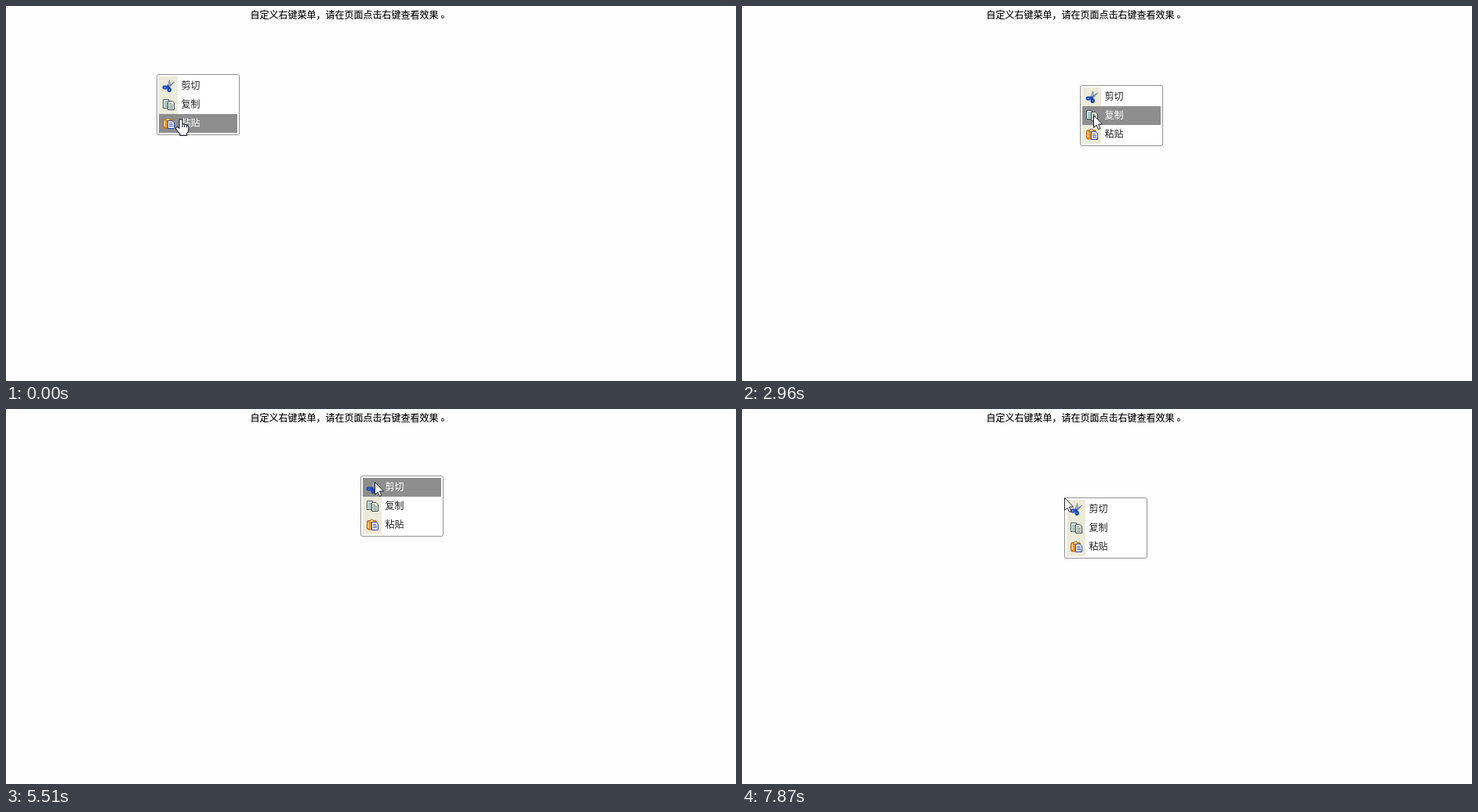
These frames come from a looping animation (931x479 px, 8 s). An HTML page:

```html
<!DOCTYPE html>
<html lang="zh-CN">
<head>
<meta charset="utf-8">
<title>自定义右键菜单</title>
<style>
  html, body { margin: 0; width: 100%; height: 100%; overflow: hidden; background: #fefefe; }
  svg { display: block; width: 931px; height: 479px; }
  text { font: 12px "Noto Sans CJK SC", "Noto Sans CJK", sans-serif; fill: #000; stroke: #000; stroke-width: .15; }
  .row text { fill: #222; stroke: none; }
  .row.on text { fill: #fff; }
  .bar { fill: none; }
  .on .bar { fill: #8e8e8e; }
  .pointer { fill: #fff; stroke: #20202c; stroke-linejoin: round; }
</style>
</head>
<body>
<svg viewBox="0 0 931 479">
  <defs>
    <g id="cut" fill="none">
      <path d="M9.5 .5 L10.8 6 L8 10 L6.8 8Z" fill="#a9b4c4" stroke="#76839a" stroke-width=".7"/>
      <path d="M15.5 3 L10.5 9 L7.5 10 L8.5 8Z" fill="#8b95a6" stroke="#626d80" stroke-width=".7"/>
      <path d="M8.5 8 L5.5 9.5 M8 9 L9.5 12" stroke="#173f9e" stroke-width="2.4"/>
      <ellipse cx="3.8" cy="10" rx="2.2" ry="1.7" stroke="#1c50c8" stroke-width="2.2"/>
      <ellipse cx="9.2" cy="13" rx="1.6" ry="2" stroke="#123fae" stroke-width="2.2"/>
    </g>
    <g id="copy">
      <path d="M1.5 1.5 H8.5 V12.5 H1.5Z" fill="#fff" stroke="#3a5456"/>
      <path d="M3 4.5 H7 M3 6.5 H7 M3 8.5 H7 M3 10.5 H7" stroke="#55918f"/>
      <path d="M7.5 3.5 H13 L15.5 6 V14.5 H7.5Z" fill="#fffde6" stroke="#34434a"/>
      <path d="M9 6.5 H12 M9 8.5 H14 M9 10.5 H14 M9 12.5 H14" stroke="#5a8188"/>
    </g>
    <g id="paste">
      <rect x="1.5" y="2.5" width="12" height="11.5" rx="2" fill="#ee8f26" stroke="#b85a10"/>
      <path d="M3.2 4.5 V12" stroke="#ffcf7a" stroke-width="1.8"/>
      <path d="M4.5 4.5 V2.5 H6 V1.2 H9 V2.5 H10.5 V4.5Z" fill="#f9e4a8" stroke="#a4651c" stroke-width=".8"/>
      <path d="M7.5 4.5 H13 L15.5 7 V14.5 H7.5Z" fill="#fff" stroke="#2441a8"/>
      <path d="M9 7.5 H13 M9 9.5 H14 M9 11.5 H14" stroke="#3458cc"/>
    </g>
  </defs>

  <text x="311.5" y="16">自定义右键菜单，请在页面点击右键查看效果<tspan dx="3" dy="-1">。</tspan></text>

  <g id="menu">
    <rect x=".5" y=".5" width="105" height="77" rx="2" fill="#fff" stroke="#929292"/>
    <rect x="3" y="3" width="24" height="72" fill="#ecebd9"/>
  </g>
  <path id="arrow" class="pointer" d="M.5 .5 V16.4 L4 13.2 L6.6 18.5 L8.9 17.5 L6.5 12 H11.5Z"/>
  <path id="hand" class="pointer" stroke-width="1.1"
    d="M-2 12.5 V2.5 Q-2 .6 0 .6 T2 2.5 V7 Q3.5 5.9 4.8 7.5 Q6.4 6.6 7.4 8.4 Q9.8 8 9.8 10.5 V14 Q9.6 17 7.5 19 V21.4 H-1 V19.5 Q-4 16.5 -6.3 13 Q-6.8 10.4 -4.6 10.5 Q-3.2 10.8 -2 12.5Z M2 7 V11 M4.8 7.5 V11 M7.4 8.4 V11.2"/>
</svg>
<script>
const LOOP = 8000, TICK = 130, ROW = 24, EDGE = 3, MENU_W = 106, STRIP = 20;
const START = [223, 144];

// from, to, x, y: where and while a menu is open
const menus = [
  [0, 1570, 192, 87], [2540, 4220, 431, 101],
  [5380, 6750, 452, 85], [7870, LOOP, 411, 113],
];

// first step, last step, end x, end y: straight pointer moves, at rest between
const moves = [
  [120, 240, 228, 120], [390, 510, 230, 104],
  [780, 900, 235, 129], [1050, 1170, 233, 140],
  [2000, 2120, 394, 124], [2270, 2400, 431, 101],
  [2660, 2960, 448, 139], [3080, 3440, 468, 156],
  [3590, 3710, 453, 116], [3830, 3950, 328, 140],
  [4590, 4710, 423, 107], [4860, 4860, 452, 85],
  [5510, 5660, 487, 100], [5810, 6050, 489, 141],
  [6200, 6200, 488, 116], [6320, 6470, 494, 98],
  [7050, 7050, 579, 126], [7200, 7200, 584, 129], [7320, 7440, 411, 113],
];

const byId = id => document.getElementById(id);
const menu = byId("menu"), arrow = byId("arrow"), hand = byId("hand");
const place = (el, x, y) => el.setAttribute("transform", `translate(${x} ${y})`);
const show = (el, on) => el.setAttribute("visibility", on ? "visible" : "hidden");

const items = [["cut", "剪切"], ["copy", "复制"], ["paste", "粘贴"]];
menu.insertAdjacentHTML("beforeend", items.map(([icon, label], i) => `
  <g class="row" transform="translate(${EDGE} ${EDGE + i * ROW})">
    <rect class="bar" width="100" height="${ROW}"/>
    <use href="#${icon}" x="4" y="4"/>
    <text x="28.5" y="16">${label}</text>
  </g>`).join(""));
const rows = [...menu.querySelectorAll(".row")];

// The pointer advances in equal jumps, one per tick.
function pointerAt(t) {
  let [x, y] = START;
  for (const [from, to, endX, endY] of moves) {
    if (t < from) break;
    const steps = 1 + Math.round((to - from) / TICK);
    const step = t >= to ? steps : 1 + Math.floor((t - from) / (to - from) * (steps - 1));
    x += (endX - x) * step / steps;
    y += (endY - y) * step / steps;
  }
  return [Math.round(x), Math.round(y)];
}

function draw(t) {
  const [x, y] = pointerAt(t);
  const open = menus.find(([from, to]) => t >= from && t < to);
  let hover = -1, pointing = false;

  if (open) {
    const [, , left, top] = open;
    const dx = x - left;
    place(menu, left, top);
    if (dx >= EDGE && dx < MENU_W - EDGE) hover = Math.floor((y - top - EDGE) / ROW);
    pointing = hover in rows && dx > STRIP;
  }
  show(menu, open);
  rows.forEach((row, i) => row.classList.toggle("on", i === hover));

  place(pointing ? hand : arrow, x, y);
  show(hand, pointing);
  show(arrow, !pointing);
}

const start = performance.now();
function tick() {
  draw((performance.now() - start) % LOOP);
  requestAnimationFrame(tick);
}
tick();
</script>
</body>
</html>
```
